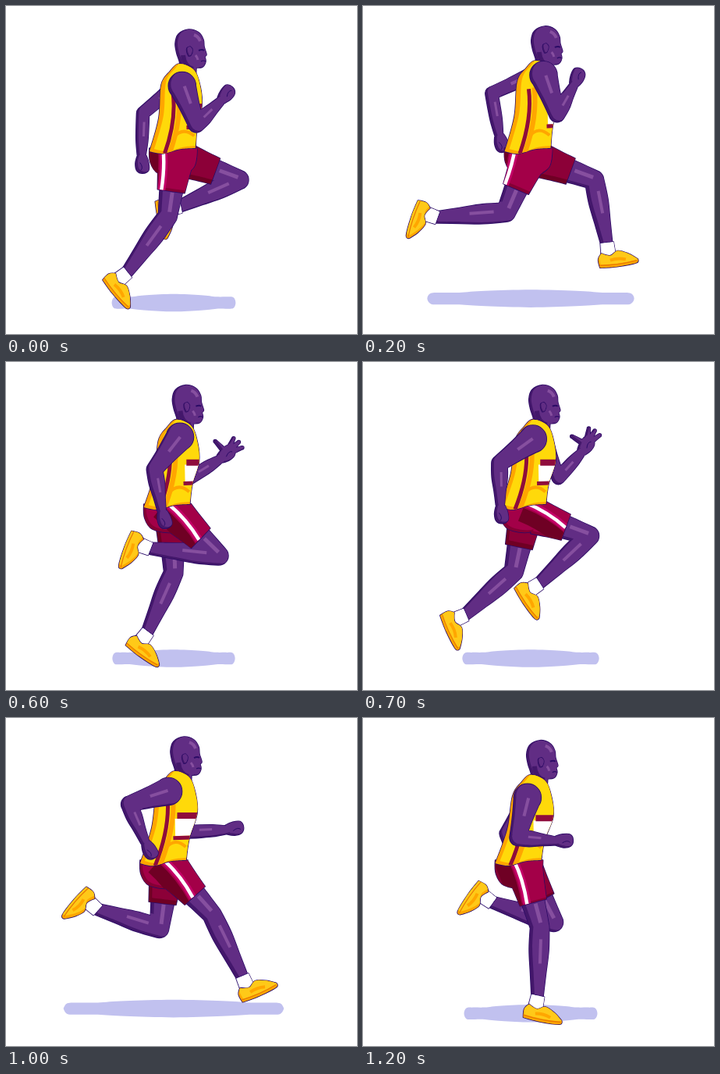
An HTML page with a canvas for the animation above (1.3 s loop, 450x420 px).

```html
<!DOCTYPE html>
<html lang="en">
<head>
<meta charset="utf-8">
<title>Runner</title>
<style>
html, body { margin: 0; width: 100%; height: 100%; overflow: hidden; background: #fff; }
canvas { display: block; }
</style>
</head>
<body>
<canvas id="stage" width="450" height="420"></canvas>
<script>
const ctx = document.getElementById('stage').getContext('2d');
const STEP = 100, LOOP = 1300;
const INK = '#2b0b66', DARK = '#43176b', SKIN = '#612d84', LIGHT = '#864f9f';
const YELLOW = '#ffd90a', ORANGE = '#ffa600', MAROON = '#8f0c3c', CRIMSON = '#a30048', WINE = '#6f0024';

// One stride in degrees (0 forward, 90 down). The far limbs run half a loop later.
// Leg: phase, thigh, shin.
const STRIDE = [
  [0, 98, 126], [200, 113, 176], [350, 97, 197], [400, 92, 203], [550, 62, 198], [600, 44, 186],
  [650, 20, 156], [850, 20, 79], [900, 17, 86], [1000, 48, 64], [1050, 60, 65], [1200, 75, 92], [1250, 88, 114]
];
// Arm: phase, upper arm, forearm.
const SWING = [
  [0, 70, -44], [200, 71, -60], [350, 78, -3], [400, 97, 32], [600, 128, 80], [650, 140, 92],
  [850, 156, 80], [900, 179, 90], [1000, 162, 67], [1050, 118, 70], [1200, 104, 5], [1250, 84, -32]
];

const mix = (a, b, t) => Array.isArray(a) ? a.map((v, i) => mix(v, b[i], t)) : a + (b - a) * t;
const rad = deg => deg * Math.PI / 180;
const polar = ([x, y], r, deg) => [x + r * Math.cos(rad(deg)), y + r * Math.sin(rad(deg))];
const add = ([x, y], dx, dy) => [x + dx, y + dy];
const wave = (t, peak, times = 1) => Math.cos(2 * Math.PI * times * (t - peak) / LOOP);

function sample(rows, time) {
  const phase = time % LOOP, j = rows.findIndex(r => r[0] > phase);
  const a = rows.at(j < 0 ? -1 : j - 1), b = rows[Math.max(j, 0)];
  const end = j < 0 ? LOOP : b[0];
  return mix(a, b, (phase - a[0]) / (end - a[0])).slice(1);
}

function legAt(time, pelvis, shinLength) {
  const [thigh, shin] = sample(STRIDE, time), forward = Math.cos(rad(thigh));
  const hip = add(pelvis, 4 + 13 * forward, 4);
  const knee = polar(hip, 72, thigh), ankle = polar(knee, shinLength, shin);
  return { hip, knee, ankle, thigh, forward, foot: shin - 76 + 11 * wave(time, 300) };
}

function armAt(time, shoulder, length) {
  const [upper, fore] = sample(SWING, time);
  const elbow = polar(shoulder, length, upper);
  const wrist = polar(elbow, 47 + 6 * Math.sin(rad(fore)), fore);
  return { shoulder, elbow, wrist, aim: fore - 8, hand: polar(wrist, 13, fore - 8) };
}

// The body bobs twice per loop, twists once and drifts slowly back.
function poseAt(t) {
  const bob = wave(t, 0, 2), twist = wave(t, 330), half = LOOP / 2;
  const head = [236 - .006 * t, 48 + 3 * bob];
  const shoulder = [226 - .009 * t + 9 * twist, 94 + 6 * bob + 6 * wave(t, 1050)];
  const pelvis = [215 - .012 * t, 194];
  return {
    head, pelvis, twist,
    shadow: { x: 215, y: 376 + 4 * bob, reach: 112 - 34 * wave(t, -30, 2) },
    nearLeg: legAt(t, pelvis, 89),
    farLeg: legAt(t + half, pelvis, 83),
    nearArm: armAt(t, shoulder, 53),
    farArm: armAt(t + half, add(shoulder, -21 * wave(t, 200), 3), 50),
    open: Math.max(0, wave(t, half))
  };
}

// Closed smooth curve that keeps sharp corners.
function blob(p, path = new Path2D()) {
  const n = p.length;
  const slope = p.map(([x, y], i) => {
    const a = p[(i + n - 1) % n], b = p[(i + 1) % n];
    const ux = x - a[0], uy = y - a[1], vx = b[0] - x, vy = b[1] - y;
    const turn = (ux * vx + uy * vy) / (Math.hypot(ux, uy) * Math.hypot(vx, vy) || 1);
    return turn < .35 ? [0, 0] : [(b[0] - a[0]) / 6, (b[1] - a[1]) / 6];
  });
  path.moveTo(...p[0]);
  p.forEach(([x, y], i) => {
    const j = (i + 1) % n, [ex, ey] = p[j];
    path.bezierCurveTo(x + slope[i][0], y + slope[i][1], ex - slope[j][0], ey - slope[j][1], ex, ey);
  });
  path.closePath();
  return path;
}

// Turns flat local coordinates into stage points.
function place(flat, [x, y], deg = 0) {
  const c = Math.cos(rad(deg)), s = Math.sin(rad(deg)), points = [];
  for (let i = 0; i < flat.length; i += 2) {
    const u = flat[i], v = flat[i + 1];
    points.push([x + u * c - v * s, y + u * s + v * c]);
  }
  return points;
}

// Tapered limb section; widths are spaced evenly from a to b.
function section(path, a, b, widths, round = true) {
  const deg = Math.atan2(b[1] - a[1], b[0] - a[0]) * 180 / Math.PI;
  const last = widths.length - 1, left = [], right = [];
  widths.forEach((w, i) => {
    const p = mix(a, b, i / last);
    left.push(polar(p, w / 2, deg + 90));
    right.unshift(polar(p, w / 2, deg - 90));
  });
  blob([...left, ...right], path);
  if (round) for (const [[x, y], w] of [[a, widths[0]], [b, widths[last]]]) {
    path.moveTo(x + w / 2, y);
    path.arc(x, y, w / 2, 0, Math.PI * 2, true);
  }
}

// Straight line, or a curve through the middle of three points.
function line([a, m, b], color, width) {
  ctx.beginPath();
  ctx.moveTo(...a);
  if (b) ctx.quadraticCurveTo(2 * m[0] - (a[0] + b[0]) / 2, 2 * m[1] - (a[1] + b[1]) / 2, ...b);
  else ctx.lineTo(...m);
  ctx.strokeStyle = color;
  ctx.lineWidth = width;
  ctx.stroke();
}

// Outline, shaded edge, main colour, then details kept inside the shape.
function paint(path, shade, color, dx, dy, details) {
  ctx.strokeStyle = INK;
  ctx.lineWidth = 1.6;
  ctx.stroke(path);
  ctx.fillStyle = shade;
  ctx.fill(path);
  ctx.save();
  ctx.clip(path);
  ctx.translate(dx, dy);
  ctx.fillStyle = color;
  ctx.fill(path);
  ctx.translate(-dx, -dy);
  if (details) details();
  ctx.restore();
}

function shine(a, b, from, to, width) {
  line([from, to].map(t => add(mix(a, b, t), 2, -2)), LIGHT, width);
}

function drawArm({ shoulder, elbow, wrist, hand, aim }, upper, open) {
  const path = new Path2D();
  section(path, shoulder, elbow, upper);
  section(path, elbow, wrist, [upper[2], upper[2], 15, 11]);
  blob(place([-11,6, -2,9, 7,8, 11,1, 8,-7, -2,-8, -11,-6], hand, aim), path);
  if (open) for (const turn of [-93, -25, -3, 20]) {
    section(path, hand, polar(hand, 22 * open, aim + turn), [8, 6, 4]);
  }
  paint(path, DARK, SKIN, 3, -2, () => {
    shine(shoulder, elbow, .05, .5, 4);
    shine(elbow, wrist, .25, .6, 3);
    line(place([-3,3, 3,1, 7,3], hand, aim), INK, 1);
  });
}

function drawLeg({ hip, knee, ankle, foot }) {
  const path = new Path2D(), at = flat => place(flat, ankle, foot);
  section(path, hip, knee, [34, 32, 28, 24]);
  section(path, knee, ankle, [24, 25, 20, 15]);
  paint(path, DARK, SKIN, 4, -2, () => {
    shine(hip, knee, .6, .95, 5);
    shine(knee, ankle, .2, .55, 4);
  });
  paint(blob(at([-8,-1, 9,-1, 10,18, -9,18])), '#dcdcf4', '#fff', 1, 0);
  paint(blob(at([-13,19, -8,12, 3,16, 13,11, 26,16, 37,24, 35,29, 10,31, -12,30])), ORANGE, '#ffc918', 1, -4, () => {
    line(at([-13,27, 12,28, 36,26]), '#e97800', 1.2);
    line(at([2,22, 12,21, 22,23]), ORANGE, 4);
  });
}

function drawHead(head) {
  const at = flat => place(flat, head);
  const shape = blob(at([-19,-3, -15,-15, -2,-21, 11,-17, 17,-8, 18,1, 21,11, 19,14, 20,20, 16,27, 8,28, 7,42, -17,40, -13,24, -17,10]));
  paint(shape, DARK, SKIN, 3, -1, () => {
    line(at([-9,12, -5,24, 4,30]), DARK, 6);
    line(at([5,-14, 10,-11, 13,-6]), LIGHT, 4);
    line(at([7,12, 9,15, 10,18]), LIGHT, 3);
    line(at([11,6, 15,5, 18,6]), INK, 2);
    line(at([14,20, 17,19, 20,20]), INK, 1.2);
  });
  paint(blob(at([-4,3, 0,1, 3,5, 1,12, -2,13, -4,8])), DARK, SKIN, 1, -1);
}

function drawShadow({ x, y, reach }) {
  const edge = [];
  for (let i = 0; i < 20; i++) {
    const a = -i / 20 * 2 * Math.PI, c = Math.cos(a), s = Math.sin(a);
    edge.push([x + reach * Math.sign(c) * Math.abs(c) ** .7,
      y + 10 * Math.sign(s) * Math.abs(s) ** .5 + 1.3 * Math.sin(5 * a)]);
  }
  ctx.fillStyle = '#c1c1ef';
  ctx.fill(blob(edge));
}

const hem = leg => mix(leg.hip, leg.knee, .55);

function drawFarShorts(leg) {
  const path = new Path2D();
  section(path, leg.hip, hem(leg), [44, 39, 35], false);
  paint(path, WINE, '#8c0038', 4, -5);
}

function drawShorts(pelvis, leg) {
  const path = blob(place([-31,-12, -30,6, -20,20, 6,24, 26,12, 30,-12], pelvis));
  section(path, leg.hip, hem(leg), [46, 40, 35], false);
  const start = add(pelvis, -12 + 14 * leg.forward, -14);
  const end = polar(hem(leg), 11 - 11 * leg.forward, leg.thigh + 90);
  const stripe = [start, add(mix(start, end, .5), 2, -2), end];
  paint(path, '#850034', CRIMSON, 3, -3, () => {
    line(stripe.map(p => polar(p, 16, leg.thigh + 90)), WINE, 18);
    line(stripe, '#c40068', 10);
    line(stripe, '#fff', 4.5);
  });
}

function drawTop({ head, pelvis, twist }) {
  const back = add(head, -37, 50), front = add(head, 13, 52);
  const hemBack = add(pelvis, -31, -8), hemFront = add(pelvis, 28, -12);
  // u runs from back to front, v from armpit to hem
  const at = (u, v) => mix(mix(back, front, u), mix(hemBack, hemFront, u), v);
  const shape = blob([add(head, -14, 23), add(head, -26, 33), back, at(.08, .5), hemBack,
    at(.3, 1.05), at(.65, 1), hemFront, at(1, .68), add(head, 15, 77), front, add(head, 5, 31)]);
  const edge = .76 + .13 * twist;
  const bar = v => [at(edge, v), at(1.3, v)];
  const seam = [at(.32, .1), at(.42, .55), at(.34, 1.05)];
  paint(shape, ORANGE, YELLOW, 6, -3, () => {
    line(seam.map(p => add(p, 7, -2)), ORANGE, 6);
    line([at(.5, .8), at(.7, .72), at(.95, .8)], ORANGE, 4);
    line(seam, MAROON, 5);
    line(bar(.5), '#fff', 22);
    line(bar(.33), MAROON, 8);
    line(bar(.66), MAROON, 5);
  });
}

function draw(pose) {
  ctx.clearRect(0, 0, 450, 420);
  ctx.lineJoin = 'round';
  drawShadow(pose.shadow);
  drawArm(pose.farArm, [20, 17, 16], pose.open);
  drawLeg(pose.farLeg);
  drawFarShorts(pose.farLeg);
  drawLeg(pose.nearLeg);
  drawShorts(pose.pelvis, pose.nearLeg);
  drawHead(pose.head);
  drawTop(pose);
  drawArm(pose.nearArm, [35, 26, 20], 0);
}

const start = performance.now();
let shown = -1;
function tick() {
  const time = Math.floor((performance.now() - start) / STEP) * STEP % LOOP;
  if (time !== shown) draw(poseAt(shown = time));
  requestAnimationFrame(tick);
}
tick();
</script>
</body>
</html>
```
